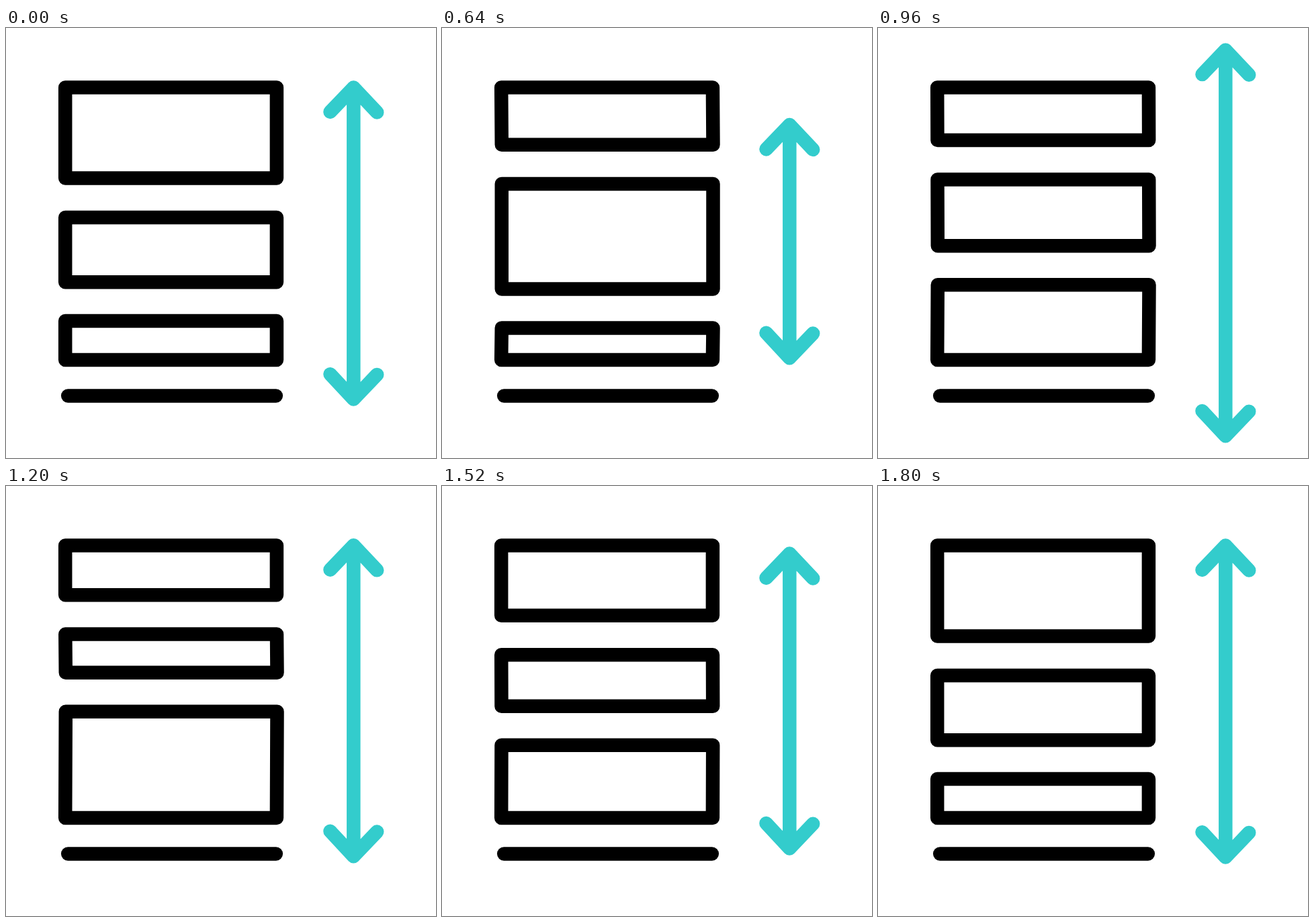
These frames come from a looping animation (640x640 px, 2 s). An HTML page:

```html
<!DOCTYPE html>
<html lang="en">
<head>
<meta charset="utf-8">
<title>Row height</title>
<style>
  html, body { margin: 0; width: 100%; height: 100%; overflow: hidden; background: #fff; }
  svg { display: block; width: 100%; height: 100%; }
  path { fill: none; stroke-width: 20.5; stroke-linecap: round; stroke-linejoin: round; }
  .rows { stroke: #000; }
  .arrow { stroke: #33cccc; }
</style>
</head>
<body>
<svg viewBox="0 0 640 640">
  <path class="rows" id="rows"/>
  <path class="rows" d="M92.2 547.6H401.8"/>
  <path class="arrow" id="arrow"/>
</svg>
<script>
const LOOP = 2000, STEP = 40, START = 120, END = 1800;
const LEFT = 88.2, RIGHT = 402.9, SHAFT = 517.3;

const rowTimes = [130, 645, 1215, 1230, 1810];
const arrowTimes = [100, 515, 960, 1320, 1800];

// Horizontal edges of the rows: y and a slight sideways drift at rest, first and second pose.
const edges = [
  { y: [88.4, 88.4, 88.4], dx: [0, 0, 0] },
  { y: [223.4, 173.7, 162.3], dx: [0, 0.6, 0] },
  { y: [282, 232, 220.6], dx: [0, 0.6, 0.1] },
  { y: [378.2, 388.5, 277.5], dx: [0, 0.6, 0.6] },
  { y: [436.1, 446.4, 335.5], dx: [0, 0.6, 0.6] },
  { y: [494, 494, 494], dx: [0, 0, 0] }
];
const topShift = [0, 82, -55.8, 19.2, 0];
const bottomShift = [0, -89, 54.8, -21, 0];

const ease = p => p * p * (3 - 2 * p);

function track(times, values, t) {
  if (t <= times[0]) return values[0];
  const next = times.findIndex(time => t < time);
  if (next < 0) return values[values.length - 1];
  const p = (t - times[next - 1]) / (times[next] - times[next - 1]);
  return values[next - 1] + (values[next] - values[next - 1]) * ease(p);
}

const rowTrack = ([rest, first, second], t) =>
  track(rowTimes, [rest, first, second, second, rest], t);

function rowsPath(t) {
  const lines = edges.map(({ y, dx }) => ({ y: rowTrack(y, t), dx: rowTrack(dx, t) }));
  return [0, 2, 4].map(i => {
    const a = lines[i], b = lines[i + 1];
    return `M${LEFT + a.dx} ${a.y}L${RIGHT + a.dx} ${a.y}L${RIGHT + b.dx} ${b.y}L${LEFT + b.dx} ${b.y}Z`;
  }).join("");
}

const head = (y, left, right) =>
  `M${SHAFT - 34.8} ${y + left}L${SHAFT} ${y}L${SHAFT + 34.9} ${y + right}`;

function arrowPath(t) {
  const top = 88.5 + track(arrowTimes, topShift, t);
  const bottom = 552.5 + track(arrowTimes, bottomShift, t);
  return `M${SHAFT} ${top}V${bottom}` + head(top, 36.4, 37.1) + head(bottom, -37.3, -36.6);
}

const rows = document.getElementById("rows");
const arrow = document.getElementById("arrow");
const began = performance.now();

function draw(now) {
  const elapsed = Math.max(0, now - began) % LOOP;
  const stepped = Math.floor(elapsed / STEP) * STEP;
  const t = stepped < START || stepped >= END ? 0 : stepped;
  rows.setAttribute("d", rowsPath(t));
  arrow.setAttribute("d", arrowPath(t));
  requestAnimationFrame(draw);
}
draw(began);
</script>
</body>
</html>
```
